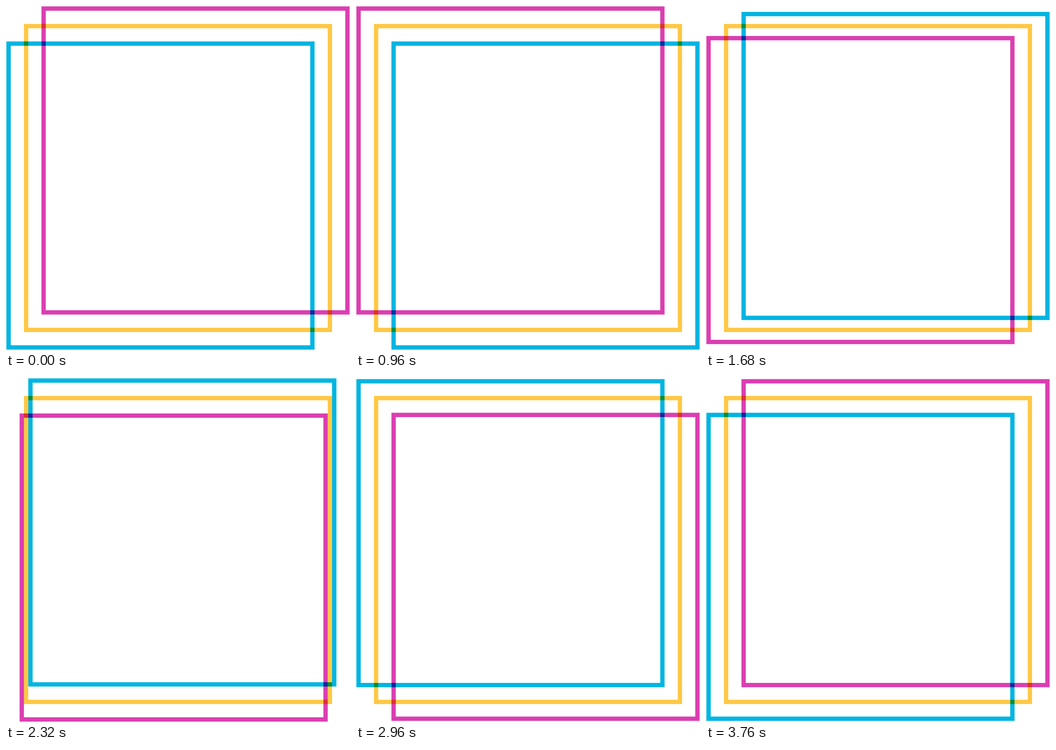
Animation, 748 px wide and 748 px high, one loop 3.84 s. Source, as an HTML page:

```html
<!DOCTYPE html>
<html lang="en">
<head>
<meta charset="utf-8">
<title>Overprint squares</title>
<style>
  html, body { margin: 0; height: 100%; overflow: hidden; background: #fff; }
  svg { display: block; width: 100vw; height: 100vh; isolation: isolate; }
  rect { fill: none; stroke-width: 9.4; mix-blend-mode: multiply; }
</style>
</head>
<body>
<svg viewBox="0 0 748 748">
  <rect id="yellow" x="43.7" y="43.7" width="660.6" height="660.6" stroke="#ffc845"/>
  <rect id="magenta" x="43.7" y="43.7" width="660.6" height="660.6" stroke="#db3eb1"/>
  <rect id="cyan" x="43.7" y="43.7" width="660.6" height="660.6" stroke="#00b5e2"/>
</svg>
<script>
  const SIDE = 960, LOOP = 4 * SIDE, TICK = 80, REACH = 38.1;
  // Corners visited by magenta; cyan mirrors them through the centre.
  const corners = [[1, -1], [-1, -1], [-1, 1], [1, 1]];
  const magenta = document.getElementById('magenta');
  const cyan = document.getElementById('cyan');
  const ease = p => p * p * (3 - 2 * p);
  const place = (el, x, y) => el.setAttribute('transform', `translate(${x} ${y})`);

  function draw(ms) {
    const t = Math.floor((ms % LOOP) / TICK) * TICK;
    const leg = Math.floor(t / SIDE);
    const k = ease((t % SIDE) / SIDE);
    const from = corners[leg], to = corners[(leg + 1) % 4];
    const [x, y] = from.map((a, i) => REACH * (a + (to[i] - a) * k));
    place(magenta, x, y);
    place(cyan, -x, -y);
  }

  const start = performance.now();
  function loop() {
    draw(performance.now() - start);
    requestAnimationFrame(loop);
  }
  loop();
</script>
</body>
</html>
```
